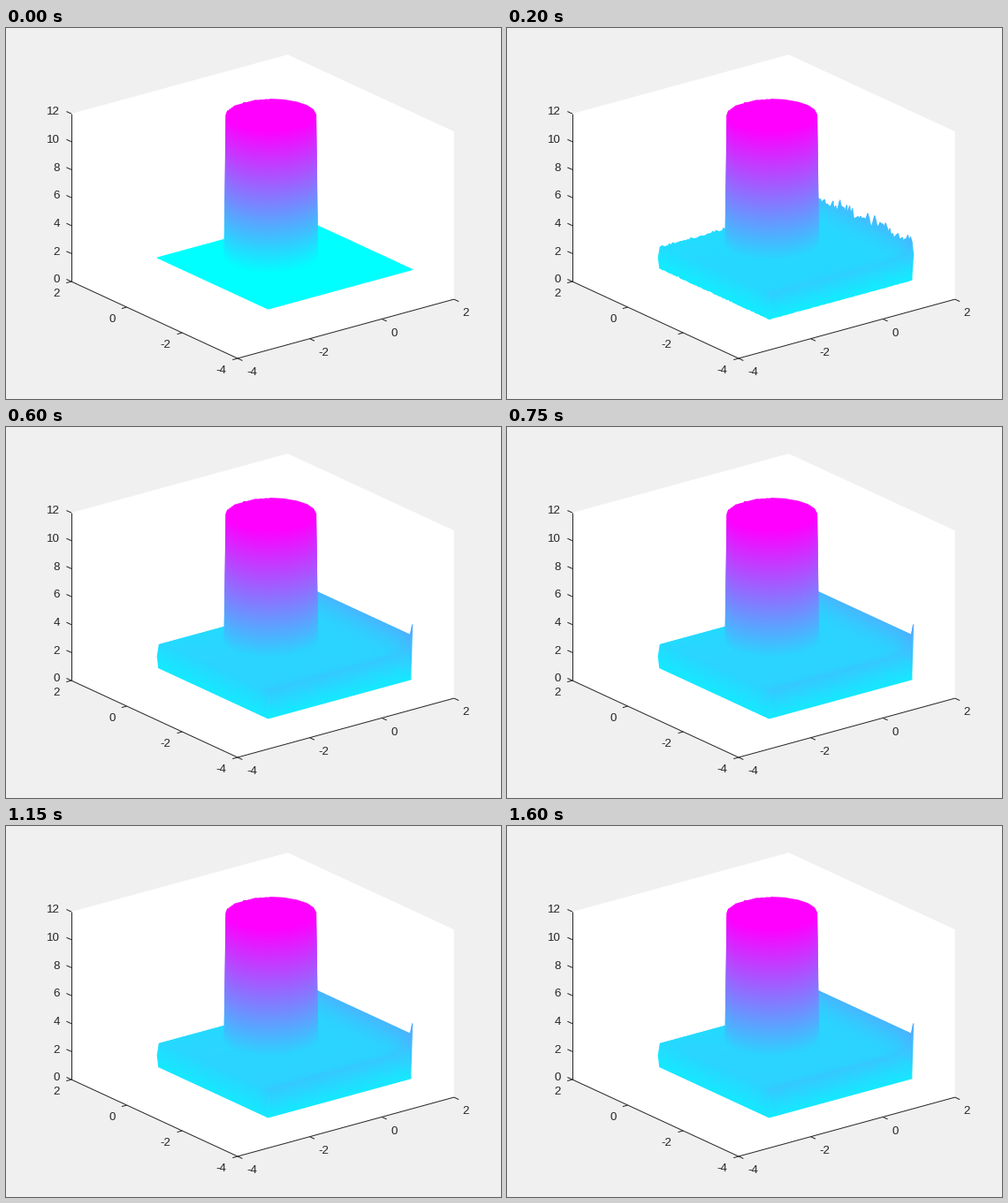
Animation of 560 by 420 pixels, one loop 2550 ms. Source, as a matplotlib script:

```python
import numpy as np
import matplotlib.pyplot as plt
from matplotlib.animation import FuncAnimation
from matplotlib.collections import PolyCollection
from matplotlib.tri import Triangulation

W, H, DPI = 560, 420, 100
FRAMES, STEP_MS, LAST_STEP = 51, 50, 32
INK = "#262626"
PX = 72 / DPI
START, TOP = 0.75, 10.93
Z_PX = 15.83


def project(x, y, z=0.0):
    """Orthographic view of data coordinates, in stage pixels."""
    return (262 + 40.8 * (x + 4) - 31.35 * (y + 4),
            374 - 11.15 * (x + 4) - 14.5 * (y + 4) - Z_PX * z)


fig = plt.figure(figsize=(W / DPI, H / DPI), dpi=DPI, facecolor="#f0f0f0")
ax = fig.add_axes([0, 0, 1, 1])
ax.axis("off")


def line(p, q):
    ax.plot([p[0], q[0]], [p[1], q[1]], color=INK, lw=PX, zorder=2,
            solid_capstyle="butt")


def label(x, y, value, ha):
    ax.text(x - 0.5, y + 4.2, str(value), ha=ha, va="baseline", color=INK,
            family="Liberation Sans", fontsize=13.33 * PX)


def draw_axes():
    hull = [(-4, 2, 0), (-4, 2, 12), (2, 2, 12), (2, -4, 12), (2, -4, 0), (-4, -4, 0)]
    ax.fill(*zip(*(project(*p) for p in hull)), color="white", lw=0, zorder=0)
    front, left, right = project(-4, -4), project(-4, 2), project(2, -4)
    line(left, project(-4, 2, 12))
    line(left, front)
    line(front, right)
    for v in range(0, 13, 2):
        x, y = project(-4, 2, v)
        line((x, y), (x - 5.5, y - 2.5))
        label(x - 12.5, y - 3, v, "right")
    for v in range(-4, 3, 2):
        x, y = project(-4, v)
        line((x, y), (x - 5.7, y + 1.6))
        label(x - 12.2, y + 13, v, "right")
        x, y = project(v, -4)
        line((x, y), (x + 5.4, y + 2.5))
        label(x + 10.5, y + 15, v, "left")


# Square grid, 0.05 apart; rows follow y, columns follow x
N, CELL = 81, 0.05
gx, gy = np.meshgrid(np.linspace(-2, 2, N), np.linspace(-2.5, 1.5, N))

plate = 1.58 + 0.3 * (1 - np.exp((gy - 1.5) / 0.8))
plate += (3.1 - plate) * np.exp((gx - 2) / 0.15)
crest = 0.6 * np.exp(-(gy + 2.5) / 0.15)


def growth(step):
    return 1 - np.exp(-step / 2.2)


def heights(step):
    """Plate relaxing from a flat sheet to its settled shape."""
    if step == 0:
        return np.full((N, N), START)
    rng = np.random.default_rng(step)
    grow = growth(step)
    noise = 0.8 * grow * np.exp(-(step / 4.6) ** 2) * rng.standard_normal((N, N))
    z = START + (plate - START) * grow + 0.1 * noise
    z[-1] += 0.1 * noise[-1]
    z[:, -1] += 0.7 * noise[:, -1]
    drop = START * np.exp(-step)
    z[:, 0] = drop + 0.12 * np.abs(noise[:, 0])
    z[0] = drop + 0.05 * np.abs(noise[0])
    z[-1, 0] = START
    z[0, -1] = START + 3.15 * (1 - np.exp(-(step / 5) ** 4))
    return z


def tints(z, step):
    """Colour values: height, with the front walls a little deeper."""
    c = z + crest * growth(step)
    c[0] = np.maximum(z[0], 0.9 * growth(step))
    c[:, 0] = np.maximum(z[:, 0], 0.9 * growth(step))
    return c


def triangles():
    """Two triangles per cell, farthest cells first."""
    back = np.arange(N - 2, -1, -1)
    rows, cols = np.meshgrid(back, back, indexing="ij")
    a = (rows * N + cols).ravel()
    b, c, d = a + 1, a + N, a + N + 1
    return np.stack([b, d, c, a, b, c], axis=1).reshape(-1, 3)


def disc_outline():
    """Unit disc as seen by the grid."""
    x = np.linspace(-1, 1, 41)
    half = np.floor(np.sqrt(np.abs(1 - x**2)) / CELL + 1e-6) * CELL
    return np.r_[x, x[::-1]], np.r_[half, -half[::-1]]


def column_slices(levels):
    """Horizontal slices of the column, slightly wider at the foot."""
    scale = np.linspace(1.04, 1, len(levels))
    return [np.column_stack(project(s * disc_x, s * disc_y, z))
            for s, z in zip(scale, levels)]


draw_axes()
disc_x, disc_y = disc_outline()
sx, sy = project(gx.ravel(), gy.ravel())
tri = Triangulation(sx, sy, triangles())
mesh = ax.tripcolor(tri, np.zeros(N * N), shading="gouraud", cmap="cool", zorder=3)
column = PolyCollection([], cmap="cool", edgecolors="none", zorder=4)
ax.add_collection(column, autolim=False)
ax.set_xlim(0, W)
ax.set_ylim(H, 0)


def update(i):
    step = min(i, LAST_STEP)
    z = heights(step)
    levels = np.linspace(z[50, 40], TOP, 170)
    tri.y = sy - Z_PX * z.ravel()
    mesh.set_array(tints(z, step).ravel())
    column.set_verts(column_slices(levels))
    column.set_array(levels)
    for part in (mesh, column):
        part.set_clim(z.min(), TOP)
    return [mesh, column]


anim = FuncAnimation(fig, update, frames=FRAMES, interval=STEP_MS, repeat=True,
                     init_func=lambda: update(0))
plt.show()
```
